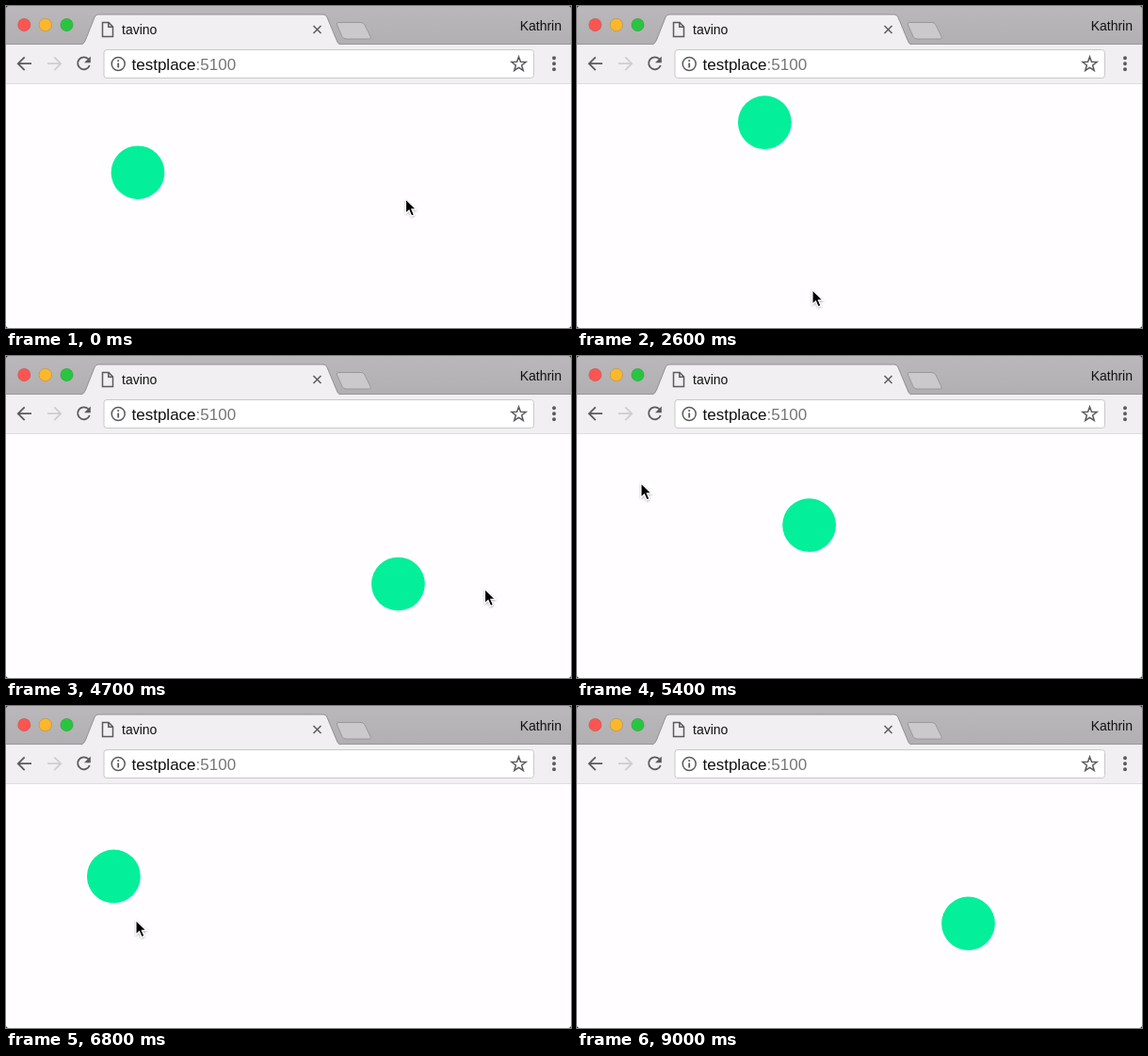
These frames come from a looping animation (600x342 px, 9100 ms). An HTML page:

```html
<!DOCTYPE html>
<html lang="en">
<head>
<meta charset="utf-8">
<title>Spring circle</title>
<style>
  html, body { margin: 0; width: 100%; height: 100%; overflow: hidden; background: #fffdff; }
  svg { display: block; width: 100vw; height: 100vh; }
  text { font-family: "Liberation Sans", Arial, sans-serif; }
  .icon { fill: none; stroke: #5b5a5c; stroke-width: 1.8; }
  .thin { stroke-width: 1.5; }
  .light { stroke: #000; stroke-opacity: .12; }
</style>
</head>
<body>
<svg viewBox="0 0 600 342">
  <defs>
    <linearGradient id="strip" x2="0" y2="1">
      <stop offset="0" stop-color="#bab8ba"/>
      <stop offset="1" stop-color="#b1afb1"/>
    </linearGradient>
    <filter id="shadow" x="-50%" y="-50%" width="200%" height="200%">
      <feDropShadow dx="0" dy="1" stdDeviation="1" flood-opacity=".35"/>
    </filter>
  </defs>

  <rect width="600" height="41" fill="url(#strip)"/>
  <rect y="40" width="600" height="1" fill="#989698"/>
  <rect y="41" width="600" height="41" fill="#f1eff1"/>
  <rect y="82" width="600" height="1" fill="#dedcde"/>

  <g class="light">
    <circle cx="19.300" cy="20" r="6.700" fill="#fc5551"/>
    <circle cx="41.800" cy="20" r="6.700" fill="#fdb72b"/>
    <circle cx="64.500" cy="20" r="6.700" fill="#28c63f"/>
  </g>

  <path d="M80 41Q83 40 84.500 36L94 12Q95 9 98 9H337Q340 9 341 12L351 36Q352 40 355 41" fill="#f1eff1" stroke="#929092"/>
  <path d="M353 17.500H377Q379.500 17.500 381 20L387 32.500Q388 35 385.500 35H361Q358.500 35 357 32.500L351.500 20Q350.500 17.500 353 17.500Z" fill="#cbc9cb" stroke="#9a989a"/>
  <path class="icon thin" d="M102.500 17.500H109L113.500 22V32.500H102.500ZM108.800 17.500V22.200H113.500"/>
  <path class="icon thin" d="M326.500 21L334.500 29M334.500 21L326.500 29"/>
  <text x="123" y="29.500" font-size="14" fill="#111">tavino</text>
  <text x="590" y="26" font-size="14" fill="#111" text-anchor="end">Kathrin</text>

  <path class="icon" d="M27 61.200H13M19.700 54.300L12.800 61.200L19.700 68.100"/>
  <path class="icon" style="stroke:#cfcdcf" d="M44 61.200H58M51.300 54.300L58.200 61.200L51.300 68.100"/>
  <path class="icon" d="M87.300 56.200A6.500 6.500 0 1 0 88.800 63"/>
  <path d="M89.800 53.500V60.300H83Z" fill="#5b5a5c"/>

  <rect x="104" y="46.500" width="456.500" height="30" rx="3" fill="#fff" stroke="#cac8ca"/>
  <circle class="icon thin" cx="119.200" cy="61.500" r="7"/>
  <path class="icon" d="M119.200 60.500V65.500M119.200 57.300V59"/>
  <text x="133.500" y="67.500" font-size="17" fill="#111">testplace<tspan fill="#777577">:5100</tspan></text>
  <path id="star" class="icon thin"/>
  <path d="M582 55.300V68" fill="none" stroke="#5b5a5c" stroke-width="4" stroke-linecap="round" stroke-dasharray="0 6"/>

  <path d="M0 0H3Q0 0 0 3ZM0 342V339Q0 342 3 342ZM600 342V339Q600 342 597 342ZM600 0V3Q600 0 597 0Z" fill="#222"/>

  <circle id="ball" r="28.400" fill="#04ef9a"/>
  <path id="cursor" d="M0 0V15.200L3.500 12L6.100 18L8.900 16.800L6.300 10.900H11Z" stroke="#fff" stroke-width="1.100" filter="url(#shadow)"/>
</svg>

<script>
const LOOP = 9100, STEP = 100, HIDE_AT = 8500;
const GLIDE = 450, REST = 60;  // pointer travel and shortest pause, ms
const STIFFNESS = 0.01;        // natural frequency of the spring, per ms

// The pointer reaches each stop at its time; the ball then springs after it.
const stop = (time, x, y) => ({ time, x, y });
const STOPS = [
  stop(-1000, 100.5, 173), stop(-60, 424.5, 204), stop(1200, 422, 195),
  stop(1700, 192, 99), stop(2540, 250, 300.5), stop(2800, 312, 262),
  stop(3620, 188, 231), stop(4450, 508.5, 246.5), stop(5200, 68, 134),
  stop(5880, 87, 128), stop(6620, 138, 226.5), stop(7450, 415.5, 231)
];

const ball = document.getElementById("ball");
const cursor = document.getElementById("cursor");

function starPath(cx, cy, outer, inner) {
  const points = Array.from({ length: 10 }, (_, i) => {
    const r = i % 2 ? inner : outer, a = Math.PI * (i / 5 - 0.5);
    return `${cx + r * Math.cos(a)} ${cy + r * Math.sin(a)}`;
  });
  return `M${points.join("L")}Z`;
}

// Critically damped response to a unit step.
function spring(t, { time }) {
  const p = Math.max(0, t - time) * STIFFNESS;
  return 1 - Math.exp(-p) * (1 + p);
}

// Smooth travel that ends at the stop's time.
function glide(t, { time }, previous) {
  const start = Math.max(time - GLIDE, previous.time + REST);
  const p = Math.min(1, Math.max(0, (t - start) / (time - start)));
  return p * p * (3 - 2 * p);
}

// Sums the moves between stops, each weighted by its progress.
function follow(t, progress) {
  let { x, y } = STOPS[0];
  for (let i = 1; i < STOPS.length; i++) {
    const from = STOPS[i - 1], to = STOPS[i], p = progress(t, to, from);
    x += (to.x - from.x) * p;
    y += (to.y - from.y) * p;
  }
  return { x, y };
}

function place(node, { x, y }) {
  node.setAttribute("transform", `translate(${x} ${y})`);
}

function render(now) {
  const t = Math.floor((now % LOOP) / STEP) * STEP;
  const tip = follow(t, glide);
  place(ball, follow(t, spring));
  place(cursor, { x: tip.x, y: tip.y + 1 });
  cursor.setAttribute("visibility", t < HIDE_AT ? "visible" : "hidden");
}

document.getElementById("star").setAttribute("d", starPath(544.5, 62, 8, 3.3));
const began = performance.now();
function tick() {
  render(performance.now() - began);
  requestAnimationFrame(tick);
}
tick();
</script>
</body>
</html>
```
